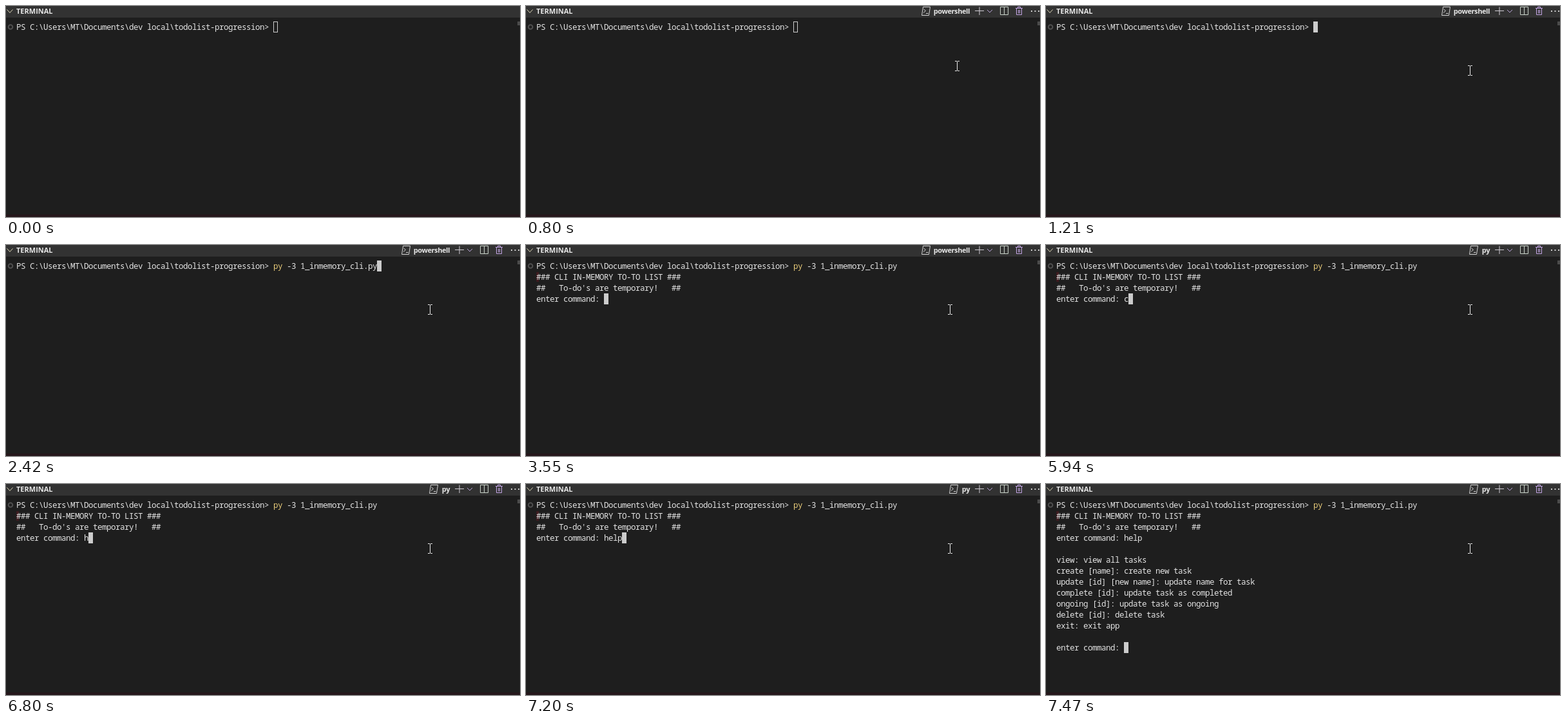
Write an HTML page that moves like this. It is 798 px wide and 327 px high and loops after 8000 ms.

```html
<!DOCTYPE html>
<html lang="en">
<head>
<meta charset="utf-8">
<title>Terminal</title>
<style>
html, body { margin: 0; width: 100%; height: 100%; overflow: hidden; background: #1e1e1e; }
body { position: relative; }
header, footer, svg, pre, i, b { position: absolute; }
header { left: 0; top: 0; width: 100%; height: 18px; background: #323232; }
footer { left: 0; top: 323px; width: 100%; height: 4px; background: #25171b; }
svg { left: 0; top: 0; fill: none; stroke: #d4d4d4; }
b {
  top: 0; white-space: nowrap; color: #e7e7e7;
  font: 700 11px/16px "Open Sans", sans-serif;
}
#title { left: 16px; }
#shell, #py { right: calc(100% - 689px); letter-spacing: -.4px; }
pre {
  left: 16px; top: 24px; margin: 0; color: #e4e4e4;
  font: 500 12.5px/17px "Noto Sans Mono", monospace;
  letter-spacing: calc(7px - 1ch); /* 7px cells */
}
pre i { font-style: normal; }
.cmd { color: #e6c978; }
#tint { left: 0; top: 18px; width: 4px; height: 15px; background: #3c1a1e; z-index: -1; }
#typed { display: inline-block; vertical-align: top; }
#cursor { left: 0; top: 0; width: 5px; height: 15px; border: 1px solid #ccc; }

/* 1% of the loop is 80 ms */
.t { animation: 8s step-end infinite; }
#tools { animation-name: tools; }
#shell, #shellIcon { animation-name: shell; }
#py, #pyIcon { animation-name: py; }
#cls { animation-name: cls; }
#run { animation-name: run; }
#banner { animation-name: banner; }
#slip { animation-name: slip; }
#typed { animation-name: typed; }
#output { animation-name: output; }
#cursor { animation-name: cursor; }
#mouse { animation-name: mouse; }

@keyframes tools { 0% { opacity: 0 } 4% { opacity: 1 } }
@keyframes shell { 0% { opacity: 0 } 4% { opacity: 1 } 55.875% { opacity: 0 } }
@keyframes py { 0% { opacity: 0 } 55.875% { opacity: 1 } }
@keyframes cls { 0% { opacity: 0 } 21.75% { opacity: 1 } 30.25% { opacity: 0 } }
@keyframes run { 0% { opacity: 0 } 30.25% { opacity: 1 } }
@keyframes banner { 0% { opacity: 0 } 44.375% { opacity: 1 } }
@keyframes slip { 0% { opacity: 0 } 74.25% { opacity: 1 } 81.75% { opacity: 0 } }
@keyframes typed {
  0% { clip-path: inset(0 28px 0 0) }
  85% { clip-path: inset(0 21px 0 0) }
  85.875% { clip-path: inset(0 14px 0 0) }
  88.375% { clip-path: inset(0 7px 0 0) }
  90% { clip-path: inset(0) }
}
@keyframes output { 0% { opacity: 0 } 93.375% { opacity: 1 } }
@keyframes cursor {
  0% { transform: translate(415px, 24px); background: transparent }
  15.125% { transform: translate(415px, 24px); background: #ccc }
  21.75% { transform: translate(436px, 24px); background: #ccc }
  30.25% { transform: translate(576px, 24px); background: #ccc }
  41.875% { transform: translate(16px, 41px); background: #ccc }
  44.375% { transform: translate(121px, 75px); background: #ccc }
  74.25% { transform: translate(128px, 75px); background: #ccc }
  81.75% { transform: translate(121px, 75px); background: #ccc }
  85% { transform: translate(128px, 75px); background: #ccc }
  85.875% { transform: translate(135px, 75px); background: #ccc }
  88.375% { transform: translate(142px, 75px); background: #ccc }
  90% { transform: translate(149px, 75px); background: #ccc }
  93.375% { transform: translate(121px, 245px); background: #ccc }
}
@keyframes mouse {
  0% { transform: translate(742px, 400px) }
  4% { transform: translate(742px, 241px) }
  5% { transform: translate(726px, 205px) }
  5.875% { transform: translate(711px, 172px) }
  6.75% { transform: translate(697px, 144px) }
  7.5% { transform: translate(686px, 121px) }
  8.375% { transform: translate(677px, 104px) }
  10% { transform: translate(669px, 93px) }
  10.875% { transform: translate(667px, 94px) }
  11.75% { transform: translate(664px, 98px) }
  13.5% { transform: translate(661px, 103px) }
  15.125% { transform: translate(658px, 100px) }
}
</style>
</head>
<body>
<header></header>
<footer></footer>

<b id="title">TERMINAL</b>
<b id="shell" class="t">powershell</b>
<b id="py" class="t">py</b>

<i id="cursor" class="t"></i>

<pre>PS C:\Users\MT\Documents\dev local\todolist-progression&gt; <i id="cls" class="t cmd">cls</i><span id="run" class="t"><span class="cmd">py</span> -3 1_inmemory_cli.py</span>
<span id="banner" class="t"><i id="tint"></i>### CLI IN-MEMORY TO-TO LIST ###
##   To-do's are temporary!   ##
enter command: </span><i id="slip" class="t">c</i><span id="typed" class="t">help</span>
<span id="output" class="t">
view: view all tasks
create [name]: create new task
update [id] [new name]: update name for task
complete [id]: update task as completed
ongoing [id]: update task as ongoing
delete [id]: delete task
exit: exit app

enter command: </span></pre>

<svg width="798" height="327" viewBox="0 0 798 327">
  <defs>
    <g id="prompt">
      <path d="M3.5 1.5H14.5L12.5 14.5H1.5Z"/>
      <path d="M4.5 5L7.5 7.5L4 10.5M8 11.5H11.5"/>
    </g>
  </defs>
  <path d="M1.5 5.5L6 10.5L10.5 5.5" stroke="#ded8b8"/>
  <circle cx="7" cy="32.5" r="3.3" stroke="#505050" stroke-width="2"/>
  <rect x="794" y="24" width="4" height="6" fill="#4b4b4b" stroke="none"/>
  <use id="shellIcon" class="t" href="#prompt" x="613"/>
  <use id="pyIcon" class="t" href="#prompt" x="656"/>
  <g id="tools" class="t">
    <path d="M697 7.5H711M704 1.5V14" stroke="#d0ccd4"/>
    <path d="M716 6L720 10L724 6" stroke="#b9a6d8"/>
    <path d="M736.5 1.5H748.5V13.5H736.5ZM742.5 1.5V13.5" stroke="#c8d2c8"/>
    <path d="M760 3.5H771M763.5 3.5V1.5H767.5V3.5M761.5 3.5V13.5H769.5V3.5M764.5 6V11.5M766.5 6V11.5" stroke="#c4a6e6"/>
    <path d="M784 7h2v2h-2zM789.5 7h2v2h-2zM795 7h2v2h-2z" fill="#ccc" stroke="none"/>
  </g>
  <path id="mouse" class="t" d="M-3 -7.5H0M1 -7.5H4M-3 7.5H0M1 7.5H4M.5 -7V7" stroke="#eee"/>
</svg>
</body>
</html>
```
